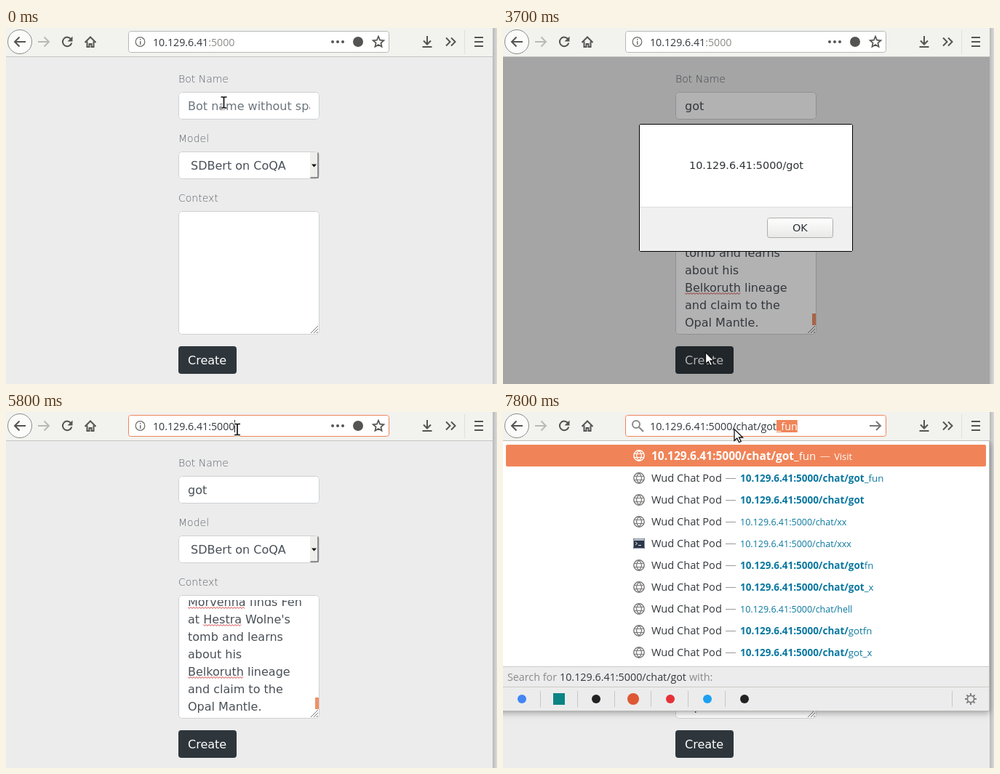
An HTML page with a canvas for the animation above (8000 ms loop, 675 by 490 pixels).

```html
<!DOCTYPE html>
<html lang="en">
<head>
<meta charset="utf-8">
<title>Bot form</title>
<style>
html, body { margin: 0; width: 100%; height: 100%; overflow: hidden; background: #ececec; }
canvas { display: block; }
</style>
</head>
<body>
<canvas id="stage" width="675" height="490"></canvas>
<script>
const LOOP = 8000;
const ctx = document.getElementById('stage').getContext('2d');
const PAGE = '"DejaVu Sans", sans-serif';
const CHROME = '"Open Sans", sans-serif';
const ORANGE = '#f08458', INK = '#33383b', ICON = '#545452', LINK = '#0a78a0', GREY = '#808080';
const HOST = '10.129.6.41:5000', BASE = HOST + '/';
const TITLE = 'Wud Chat Pod';

// [time, x, y, shape]; each entry holds until the next
const POINTER = [
  [0, 299.5, 102.5, 'beam'], [1700, 300, 142, 'arrow'], [1800, 298, 190, 'arrow'],
  [1900, 286, 262, 'beam'], [2000, 281, 287, 'beam'], [2300, 281, 298, 'beam'],
  [3000, 280, 345, 'beam'], [3100, 279, 428, 'arrow'], [3200, 278, 446, 'hand'],
  [3700, 278, 446, 'arrow'], [4100, 284, 441, 'arrow'], [4200, 308, 408, 'arrow'],
  [4300, 346, 358, 'arrow'], [4400, 390, 306, 'arrow'], [4500, 424, 276, 'arrow'],
  [4600, 431, 268, 'arrow'], [4700, 418, 272, 'arrow'], [5300, 378, 140, 'arrow'],
  [5400, 330, 24, 'beam'], [5600, 322, 24, 'beam'], [5700, 318, 24, 'beam'], [6200, 317.5, 23, 'arrow']
];
const NAME_FOCUS = [[0, 0], [400, .35], [500, .8], [700, 1], [2200, .4], [2300, 0]];
const CONTEXT_FOCUS = [[0, 0], [2200, .6], [2300, 1], [3700, 0]];
const BUTTON_FOCUS = [[0, 0], [5000, .7], [5100, 1], [5600, .6], [5700, .2], [5800, 0]];
const BUTTON_DARK = [[0, 0], [3200, .5], [3400, .8], [3500, 1], [3700, 0], [5000, .5], [5100, 0]];
const DIM = [[0, 0], [3700, .3], [3800, .45], [5000, 0]];
const BOT_NAME = [[0, ''], [1000, 'g'], [1200, 'got']];
const TYPED = [[0, ''], [6400, 'c'], [6500, 'ch'], [6700, 'cha'], [6900, 'chat'],
  [7600, 'chat/'], [7700, 'chat/go'], [7800, 'chat/got']];

const CONTEXT = ['Morvenna finds Fen', "at Hestra Wolne's", 'tomb and learns', 'about his',
  'Belkoruth lineage', 'and claim to the', 'Opal Mantle.'];
const MISSPELT = ['Morvenna', 'Hestra', 'Belkoruth'];
const FIRST_RESULTS = ['tab', 'chat/got_fun', 'chat/got', 'chat/xx', 'static/chat_m…', 'chat/xxx',
  'static/main.js', 'chat/gotfn', 'chat/got_x'];
const CHAT_RESULTS = ['got_fun', 'got', 'xx', 'xxx', 'gotfn', 'got_x', 'hell', 'gotfn', 'got_x'].map(s => 'chat/' + s);

const at = (keys, t) => keys.findLast(k => k[0] <= t);
const value = (keys, t) => at(keys, t)[1];

function text(str, x, y, font, color) {
  ctx.font = font;
  ctx.fillStyle = color;
  ctx.fillText(str, x, y);
  return x + ctx.measureText(str).width;
}
const pageText = (str, x, y, size = 16, color = '#495057') => text(str, x, y, `${size}px ${PAGE}`, color);
const chromeText = (str, x, y, size, color, weight = 400) => text(str, x, y, `${weight} ${size}px ${CHROME}`, color);

function rect(x, y, w, h, color) {
  ctx.fillStyle = color;
  ctx.fillRect(x, y, w, h);
}
function box(x, y, w, h, r, fill, border) {
  ctx.beginPath();
  ctx.roundRect(x, y, w, h, r);
  ctx.fillStyle = fill;
  ctx.fill();
  if (!border) return;
  ctx.beginPath();
  ctx.roundRect(x + .5, y + .5, w - 1, h - 1, r);
  ctx.strokeStyle = border;
  ctx.lineWidth = 1;
  ctx.stroke();
}
function line(path, color = ICON, width = 2) {
  ctx.strokeStyle = color;
  ctx.lineWidth = width;
  ctx.stroke(new Path2D(path));
}
function circle(x, y, r, fill, border, width = 1) {
  ctx.beginPath();
  ctx.arc(x, y, r, 0, 7);
  if (fill) { ctx.fillStyle = fill; ctx.fill(); }
  if (border) { ctx.strokeStyle = border; ctx.lineWidth = width; ctx.stroke(); }
}
function clipped(x, y, w, h, draw) {
  ctx.save();
  ctx.beginPath();
  ctx.rect(x, y, w, h);
  ctx.clip();
  draw();
  ctx.restore();
}

function field(y, h, focus) {
  const spread = 3.2 * focus;
  if (focus) box(237 - spread, y - spread, 194 + 2 * spread, h + 2 * spread, 6, '#aecff1');
  box(237, y, 194, h, 4, '#fff', focus > .5 ? '#8abdf0' : '#cdd0d3');
}
function squiggle(x, y, w) {
  let path = `M${x} ${y}`;
  for (let i = 2; i <= w; i += 2) path += `L${x + i} ${y + (i % 4 ? 2 : 0)}`;
  line(path, '#d23b3b', 1);
}
function drawContext(t) {
  clipped(250, 259, 175, 160, () => CONTEXT.forEach((str, i) => {
    const y = 267 + 24 * i;
    pageText(str, 250, y);
    const word = MISSPELT.find(w => str.includes(w));
    if (!word) return;
    const start = 250 + ctx.measureText(str.slice(0, str.indexOf(word))).width;
    squiggle(start, y + 1.5, ctx.measureText(word).width);
  }));
  if (t < 3400) rect(350, 396, 1, 18, '#333');
  rect(425, 393, 5, 16, '#f08f66');
}
function drawForm(t) {
  rect(0, 40, 669, 450, '#ececec');
  [['Bot Name', 75], ['Model', 157], ['Context', 239]].forEach(([label, y]) =>
    text(label, 237, y, `300 14px ${PAGE}`, '#5a6169'));

  field(88, 38, value(NAME_FOCUS, t));
  const name = value(BOT_NAME, t);
  clipped(250, 90, 168, 34, () =>
    pageText(name || 'Bot name without spaces', 250, 113, 16, name ? '#495057' : '#6c757d'));

  field(170, 38, 0);
  pageText('SDBert on CoQA', 254, 195);
  box(418, 171, 12, 36, 1, '#eeeeec');
  line('M429 171.5V206H418.5', '#8d8d8b', 2);
  ctx.fillStyle = '#111';
  ctx.fill(new Path2D('M420 187.5h7l-3.5 4z'));

  field(252, 170, value(CONTEXT_FOCUS, t));
  if (t >= 2700) drawContext(t);
  line('M419 420l10-10M423 420l6-6M427 420l2-2', '#777', 1);

  const ring = 2.6 * value(BUTTON_FOCUS, t), dark = value(BUTTON_DARK, t);
  if (ring) box(237 - ring, 438 - ring, 80 + 2 * ring, 38 + 2 * ring, 5, '#a5abaf');
  const shade = (from, to) => from + (to - from) * dark;
  box(237, 438, 80, 38, 4, `rgb(${shade(46, 31)},${shade(54, 37)},${shade(60, 40)})`);
  pageText('Create', 250, 463, 16, '#fff');
}

function drawDialog(dim) {
  rect(0, 40, 669, 450, `rgba(0,0,0,${dim})`);
  box(187, 132, 294, 176, 1, '#fff', '#000');
  rect(188, 246, 292, 61, '#f0f0f0');
  rect(188, 246, 292, 1, '#dedede');
  pageText(BASE + 'got', 256, 194, 14.4, '#2e3436');
  const face = ctx.createLinearGradient(0, 261, 0, 289);
  face.addColorStop(0, '#fff');
  face.addColorStop(1, '#e8e8e7');
  box(363, 261, 91, 28, 3, face, '#adadab');
  pageText('OK', 398, 280, 14.4, '#2e3436');
}

function completion(typed) {
  if (!typed || typed === 'chat/') return '';
  return (typed.startsWith('chat/') ? 'chat/got_fun' : 'chat/').slice(typed.length);
}
function drawStar(x, y) {
  ctx.beginPath();
  for (let i = 0; i < 10; i++) {
    const a = i * Math.PI / 5 - Math.PI / 2, r = i % 2 ? 3.6 : 7.8;
    ctx.lineTo(x + r * Math.cos(a), y + r * Math.sin(a));
  }
  ctx.closePath();
  ctx.strokeStyle = ICON;
  ctx.lineWidth = 1.7;
  ctx.stroke();
}
function drawAddress(t) {
  const focused = t >= 5600, typing = t >= 6200;
  box(168, 4, 359, 30, 3, '#fff', focused ? ORANGE : '#b8b8b5');
  if (typing) {
    circle(183, 17, 5, null, '#8a8a8a', 2);
    line('M186.5 20.5L193 27', '#8a8a8a', 2.2);
    line('M504 19h15M513 13l6 6-6 6', '#777', 2);
    const typed = value(TYPED, t), rest = completion(typed);
    const end = chromeText(BASE + typed, 202, 25, 14.3, INK);
    if (rest) {
      rect(end, 11, ctx.measureText(rest).width, 17, ORANGE);
      chromeText(rest, end, 25, 14.3, '#fff');
    } else rect(Math.round(end), 11, 1, 17, '#222');
    return;
  }
  circle(184.5, 19, 6.3, null, '#6a6a68', 1.2);
  rect(184, 18, 1.4, 5, '#6a6a68');
  rect(184, 15, 1.4, 1.6, '#6a6a68');
  const selected = focused && t < 5800;
  if (selected) rect(202, 11, 112, 17, ORANGE);
  const split = chromeText('10.129.6.41', 202, 25, 14.2, selected ? '#fff' : INK);
  const end = chromeText(':5000', split, 25, 14.2, selected ? '#fff' : focused ? INK : '#8b8b89');
  if (t >= 5800) rect(Math.round(end), 11, 1, 17, '#222');
  [449, 456, 463].forEach(x => circle(x, 19, 2, ICON));
  circle(484, 19, 7, ICON);
  drawStar(512, 19.5);
}
function drawToolbar(t) {
  rect(0, 0, 669, 40, '#f2f2ef');
  rect(0, 39, 669, 1, '#c6c6c3');
  circle(19, 19, 16.5, '#fbfbfa', '#8b8b89');
  line('M27 19H12M18.5 12.5L12 19L18.5 25.5');
  line('M44 19H59M52.5 12.5L59 19L52.5 25.5', '#b9b9b7');
  line('M89.5 15.5A6.3 6.3 0 1 0 90.3 20.5');
  ctx.fillStyle = ICON;
  ctx.fill(new Path2D('M91.5 11.5v7h-7z'));
  line('M108.5 20l7.5-7.5 7.5 7.5M111.5 18.5v7.5h3v-4h3v4h3v-7.5');
  drawAddress(t);
  line('M579 11v11M574 17.5l5 5 5-5M572.5 26h13');
  line('M605 13.5l5.5 5.5-5.5 5.5M612 13.5l5.5 5.5-5.5 5.5');
  rect(630, 3, 1, 33, '#e0e0dd');
  line('M644 13h12M644 19h12M644 25h12');
}

function globe(y, color) {
  circle(187, y, 7.2, null, color, 1.5);
  line(`M180 ${y - 2.5}h14M180 ${y + 2.5}h14M187 ${y - 7}q-7 7 0 14M187 ${y - 7}q7 7 0 14`, color, 1.2);
}
function terminal(y) {
  box(179, y - 7, 16, 14, 1, '#2b3648', '#8d98a5');
  rect(180, y - 6, 14, 2, '#b9c3cd');
  line(`M182 ${y - 2}l2.5 2-2.5 2M186 ${y + 2.5}h4`, '#e8edf2', 1);
}
function drawResult(path, i, typed, chatOnly) {
  const y = 91 + 30 * i, baseline = y + 5;
  const isTab = path === 'tab', isStatic = path.startsWith('static');
  if (isTab || path === 'chat/xxx') terminal(y); else globe(y, '#7b7b7b');
  if (isStatic) chromeText('10.129.6.41', 204, baseline, 15.6, INK);
  else chromeText(TITLE, 204, baseline, 14.6, INK);
  const x = isStatic ? 313 : 326;
  rect(x - 20, y, 14, 1, '#999');
  if (isTab) {
    box(159, y - 6, 12, 9, 1, '#777');
    rect(157, y + 3, 16, 2, '#777');
    chromeText('Switch to Tab', x, baseline, 12.8, LINK);
    return;
  }
  // the two lowest rows lag behind the typed text
  const query = i > 6 ? typed.slice(0, 5) : typed;
  const matches = path.startsWith(query);
  if (!matches && chatOnly) {
    chromeText(BASE + path, x, baseline, 12.5, LINK);
    return;
  }
  const bold = matches ? query : '';
  const end = chromeText(BASE + bold, x, baseline, 13.5, LINK, 700);
  chromeText(path.slice(bold.length), end, baseline, 13.2, LINK);
}
function drawSuggestions(t) {
  const typed = value(TYPED, t), chatOnly = t >= 7200;
  ctx.save();
  ctx.shadowColor = 'rgba(0,0,0,.35)';
  ctx.shadowBlur = 9;
  ctx.shadowOffsetY = 3;
  clipped(0, 40, 675, 450, () => rect(-10, 40, 679, 371, '#fff'));
  ctx.restore();
  rect(668, 40, 1, 371, '#c4c4c2');
  rect(0, 39, 669, 1, '#bdbdba');

  box(4, 45, 660, 30, 2, ORANGE);
  if (typed) globe(60, '#fff'); else terminal(61);
  let x = chromeText(BASE + typed, 204, 66, 15.5, '#fff', 700);
  x = chromeText(completion(typed), x, 66, 15, '#fff');
  rect(x + 6, 61, 13, 1, '#fbd9ca');
  chromeText('Visit', x + 25, 66, 12.8, '#fff');
  (chatOnly ? CHAT_RESULTS : FIRST_RESULTS).forEach((path, i) => drawResult(path, i, typed, chatOnly));

  rect(0, 350, 668, 61, '#ececec');
  rect(0, 350, 668, 1, '#cbcbc9');
  rect(0, 378, 668, 1, '#cbcbc9');
  rect(0, 411, 669, 1, '#b5b5b3');
  chromeText('Search for', 6, 370, 14.3, '#8a8a8a');
  x = chromeText(BASE + typed, 78, 370, 14.3, INK);
  chromeText('with:', x + 4, 370, 14.3, '#8a8a8a');
  ['#4285f4', '#0c8484', '#222', '#de5833', '#e53238', '#1da1f2', '#222'].forEach((color, i) => {
    const cx = 26 + 51 * i;
    if (i === 1) rect(cx - 8, 387, 16, 16, color);
    else circle(cx, 395, i === 3 ? 8 : 6, color);
    if (i < 6) rect(51 + Math.round(50.8 * i), 384, 1, 22, '#c6c6c4');
  });
  rect(617, 384, 1, 22, '#c6c6c4');
  circle(643, 395, 4.6, null, GREY, 1.8);
  for (let i = 0; i < 8; i++) {
    const c = Math.cos(i * Math.PI / 4), s = Math.sin(i * Math.PI / 4);
    line(`M${643 + 5 * c} ${395 + 5 * s}L${643 + 8 * c} ${395 + 8 * s}`, GREY, 2);
  }
}

const SHAPES = {
  arrow: new Path2D('M.5 .5V16.5L4.3 13 7 18.7 9.7 17.5 7 12H12Z'),
  hand: new Path2D('M0 15.5L-4.5 9.5Q-5-8+7.5-2.5 8L-1 9V1Q.5-1 2 1V6Q3.5 5 4.8 6.6 6 5.8 7 7.4 9 7 9 9.2V13L7.5 16Z'.replace('-5-8+7.5', '-5 6.8')),
  beam: new Path2D('M-4-7.5h3l1 1 1-1h3M0-6.5V6.5M-4 7.5h3l1-1 1 1h3')
};
function drawPointer(t) {
  const [, x, y, name] = at(POINTER, t);
  const shape = SHAPES[name], isBeam = name === 'beam';
  ctx.save();
  ctx.translate(x, y);
  ctx.strokeStyle = isBeam ? '#fff' : '#111';
  ctx.lineWidth = isBeam ? 4 : 1.3;
  ctx.fillStyle = '#fff';
  if (!isBeam) ctx.fill(shape);
  ctx.stroke(shape);
  if (isBeam) {
    ctx.strokeStyle = '#111';
    ctx.lineWidth = 1.7;
    ctx.stroke(shape);
  }
  ctx.restore();
}
function drawWindowEdge() {
  const edge = ctx.createLinearGradient(669, 0, 675, 0);
  edge.addColorStop(0, '#b9b9b9');
  edge.addColorStop(1, '#dadada');
  rect(669, 0, 6, 490, edge);
}

function draw(now) {
  const t = now % LOOP;
  drawWindowEdge();
  drawForm(t);
  drawToolbar(t);
  const dim = value(DIM, t);
  if (dim) drawDialog(dim);
  if (t >= 6200) drawSuggestions(t);
  drawPointer(t);
  requestAnimationFrame(draw);
}
requestAnimationFrame(draw);
</script>
</body>
</html>
```
